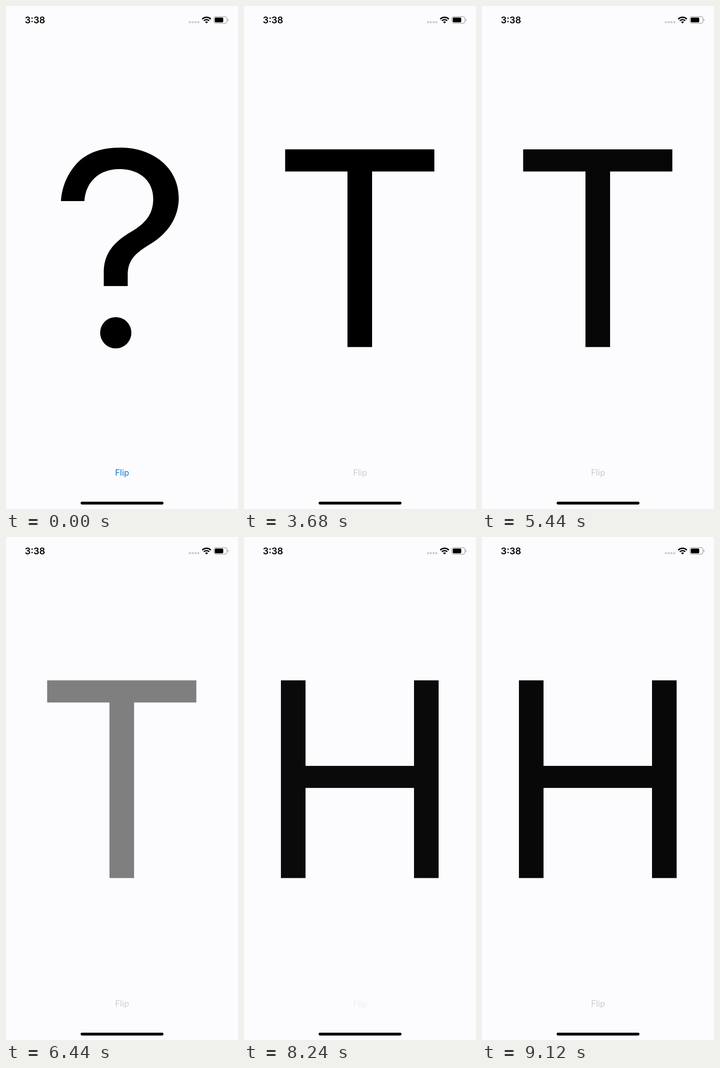
An HTML page for the animation above (9160 ms loop, 509 by 1101 pixels).

```html
<!DOCTYPE html>
<html lang="en">
<head>
<meta charset="utf-8">
<title>Coin flip</title>
<style>
  html, body { margin: 0; width: 100%; height: 100%; overflow: hidden; background: #fcfcfe; }
  svg { display: block; width: 509px; height: 1101px; }
  text { font-family: Inter, "Liberation Sans", sans-serif; }
</style>
</head>
<body>
<svg viewBox="0 0 509 1101">
  <text x="41.2" y="37.6" font-size="20" font-weight="600">3:38</text>
  <path d="M401.5 35.4h22.7" stroke="#cacaca" stroke-width="4.2" stroke-dasharray="4.2 1.9"/>
  <g fill="none" stroke="#000">
    <path d="M430.6 28.8A13.2 13.2 0 0 1 449.4 28.8" stroke-width="3"/>
    <path d="M434.1 32.3A8.3 8.3 0 0 1 445.9 32.3" stroke-width="2.8"/>
  </g>
  <path d="M440 38.2L436.8 35A4.5 4.5 0 0 1 443.2 35Z"/>
  <rect x="456" y="23.3" width="28.8" height="14.4" rx="4" fill="none" stroke="#999" stroke-width="1.2"/>
  <rect x="458" y="25.3" width="18.6" height="10.4" rx="2.2"/>
  <path d="M486.4 28.2Q488.2 29 488.2 30.5T486.4 32.8Z" fill="#999"/>

  <path id="ask" d="M120.5 427C123 393 136 366 155 345C177 321 210 310 250 310C325 310 379 356 379 420
    C379 462 356 498 315 522C280 543 267 559 267 590V613H214.5V583C214.5 545 233 518 275 494
    C309 474 323 453 323 422C323 383 293 357 249 357C205 357 175 384 172 427Z
    M206.5 715.2a34.3 34.3 0 0 1 68.6 0a34.3 34.3 0 0 1 -68.6 0Z"/>
  <path id="tails" d="M90.3 313.8H417.6V362.2H281V746.5H227V362.2H90.3Z"/>
  <path id="heads" d="M81 313.8H135V501H373V313.8H427V746.5H373V549.2H135V746.5H81Z"/>

  <text id="flip" x="254.7" y="1028" font-size="18.4" text-anchor="middle">Flip</text>
  <rect x="163.7" y="1085" width="181.8" height="6.2" rx="3.1"/>
</svg>
<script>
  const LOOP = 9160, FADE = 500, RECOVER = 300, DIM = 0.2;
  // Each tap: finger down, finger up, face shown afterwards.
  const taps = [
    [2580, 2670, 'tails'],
    [4320, 4490, 'tails'],
    [6080, 6190, 'heads'],
    [8000, 8178, 'heads']
  ];
  const faces = ['ask', 'tails', 'heads'];
  const el = id => document.getElementById(id);
  const flip = el('flip');

  // Eased progress from 0 to 1 between start and start + span.
  function ease(t, start, span) {
    const x = Math.min(1, Math.max(0, (t - start) / span));
    return (1 - Math.cos(Math.PI * x)) / 2;
  }

  function draw(t) {
    let face = 'ask', alpha = 1, label = 1;
    for (const [down, up, next] of taps) {
      if (t < down) break;
      label = DIM + (1 - DIM) * ease(t, up, RECOVER);
      if (t < up + FADE) {
        alpha = 1 - ease(t, up, FADE);
      } else {
        face = next;
        alpha = ease(t, up + FADE, FADE);
      }
    }
    for (const id of faces) el(id).style.opacity = id === face ? alpha : 0;
    flip.style.fill = t < taps[0][0] ? '#0a78dc' : '#cbcbcb';
    flip.style.opacity = label;
  }

  const begin = performance.now();
  function tick() {
    draw((performance.now() - begin) % LOOP);
    requestAnimationFrame(tick);
  }
  tick();
</script>
</body>
</html>
```
